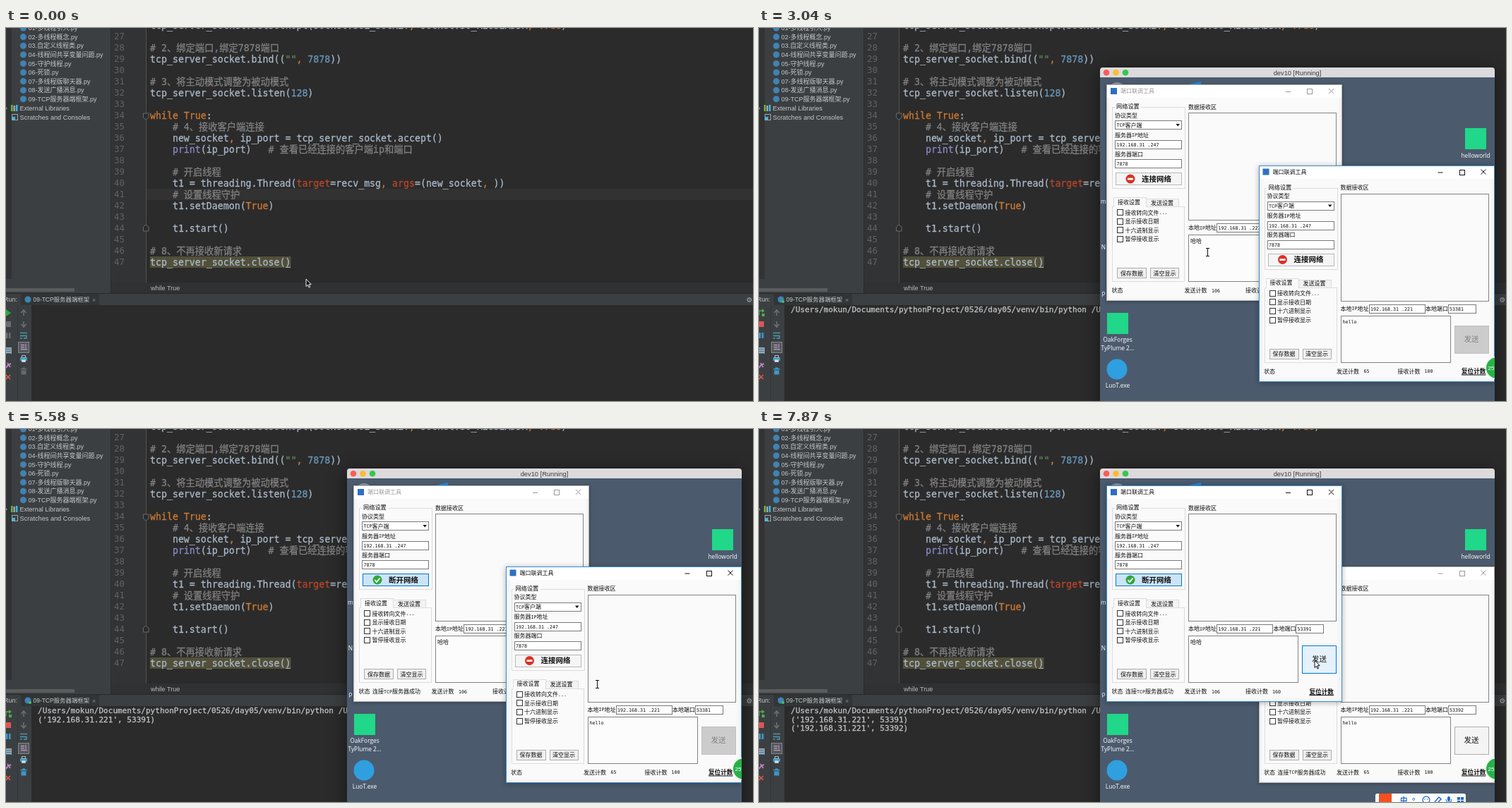
An HTML page with a canvas for the animation above (8 s loop, 1058x529 px).

```html
<!DOCTYPE html>
<html lang="zh">
<head>
<meta charset="utf-8">
<style>
html, body { margin: 0; width: 100%; height: 100%; overflow: hidden; background: #2b2b2b; }
canvas { display: block; }
</style>
</head>
<body>
<canvas id="stage" width="1058" height="529"></canvas>
<script>
const g = document.getElementById('stage').getContext('2d');
const CJK = '"Noto Sans CJK SC","Noto Sans CJK"';
const MONO = `"DejaVu Sans Mono",${CJK},monospace`;
const SANS = `"Liberation Sans",${CJK},sans-serif`;
const UI = `"Open Sans",${CJK},sans-serif`;

// y is the visual middle of the line; returns the x after the text
function text(s, x, y, size, color, family = SANS, weight = '', align = 'left') {
  g.font = `${weight} ${size}px ${family}`;
  g.fillStyle = color;
  g.textAlign = align;
  g.fillText(s, x, y + size * 0.36);
  return x + g.measureText(s).width;
}
// Monospaced text with slightly thickened strokes
function code(s, x, y, size, color) {
  const end = text(s, x, y, size, color, MONO);
  g.strokeStyle = color;
  g.lineWidth = 0.3;
  g.strokeText(s, x, y + size * 0.36);
  return end;
}
// Half-width Latin, full-width Chinese
function label(s, x, y, color = '#111', size = 8, weight = '') {
  for (const c of s) {
    const latin = c < '\x7f';
    text(c, x, y, latin ? size * 0.83 : size, color, MONO, weight);
    x += latin ? size / 2 : size;
  }
}
function fill(color, x, y, w, h) { g.fillStyle = color; g.fillRect(x, y, w, h); }
// Snaps to whole stage pixels
function box(x, y, w, h, back, edge) {
  const { e, f } = g.getTransform();
  x = Math.round(x + e) - e;
  y = Math.round(y + f) - f;
  if (back) fill(back, x, y, w, h);
  g.strokeStyle = edge;
  g.lineWidth = 1;
  g.strokeRect(x + 0.5, y + 0.5, w - 1, h - 1);
}
function dot(color, x, y, r) {
  g.fillStyle = color;
  g.beginPath();
  g.arc(x, y, r, 0, 7);
  g.fill();
}
function trace(pts) {
  g.beginPath();
  for (let i = 0; i < pts.length; i += 2) g.lineTo(pts[i], pts[i + 1]);
}
function line(color, width, ...pts) {
  trace(pts);
  g.strokeStyle = color;
  g.lineWidth = width;
  g.stroke();
}
function poly(color, ...pts) { trace(pts); g.fillStyle = color; g.fill(); }
function round(color, x, y, w, h, r) {
  g.fillStyle = color;
  g.beginPath();
  g.roundRect(x, y, w, h, r);
  g.fill();
}
function shadow(color, blur, dy = 0) {
  g.shadowColor = color;
  g.shadowBlur = blur;
  g.shadowOffsetY = dy;
}

const INK = { d: '#a9b7c6', k: '#cc7832', c: '#808080', b: '#8888c6', a: '#b8462a', n: '#6897bb', s: '#6a8759' };
// Pieces split by "|"; the first letter of each picks its colour
const CODE = {
  26: 'dtcp_server_socket.setsockopt(socket.SOL_SOCKET|k, |dsocket.SO_REUSEADDR|k, True|d)',
  28: 'c# 2、绑定端口,绑定7878端口',
  29: 'dtcp_server_socket.bind((|s""|k, |n7878|d))',
  31: 'c# 3、将主动模式调整为被动模式',
  32: 'dtcp_server_socket.listen(|n128|d)',
  34: 'kwhile True|d:',
  35: 'c    # 4、接收客户端连接',
  36: 'd    new_socket|k, |dip_port = tcp_server_socket.accept()',
  37: 'b    print|d(ip_port)   |c# 查看已经连接的客户端ip和端口',
  39: 'c    # 开启线程',
  40: 'd    t1 = threading.Thread(|atarget|d=recv_msg|k, |aargs|d=(new_socket|k, |d))',
  41: 'c    # 设置线程守护',
  42: 'd    t1.setDaemon(|kTrue|d)',
  44: 'd    t1.start()',
  46: 'c# 8、不再接收新请求',
  47: 'dtcp_server_socket.close()'
};
const FILES = ['01-多线程引入', '02-多线程概念', '03.自定义线程类', '04-线程间共享变量问题', '05-守护线程',
  '06-死锁', '07-多线程版聊天器', '08-发送广播消息', '09-TCP服务器端框架'];
const HOME = '/Users/mokun/Documents/pythonProject/0526/day05/';

function drawEditor(focused) {
  fill('#2b2b2b', 0, 0, 1058, 529);
  fill('#313335', 149, 0, 49, 362);
  if (focused) fill('#323232', 199, 228, 859, 16);
  fill('#55554a', 198, 0, 1, 362);
  fill('#52503a', 204, 324, 199.5, 16);
  for (let n = 26; n < 48; n++) {
    const y = 28 + 16 * (n - 28);
    text(n, 168, y, 12.4, '#606366', MONO, '', 'right');
    let x = 204;
    for (const part of (CODE[n] || 'd').split('|')) x = code(part.slice(1), x, y, 13.25, INK[part[0]]);
  }
  line('#a9b7c6', 1, 396, 339.5, 403, 339.5);
  for (const [y, d] of [[125, 1], [284, -1]]) {
    poly('#2b2b2b', 194, y - 4 * d, 202, y - 4 * d, 202, y + 2 * d, 198, y + 5 * d, 194, y + 2 * d);
    line('#686a6c', 1, 194.5, y - 4 * d, 202, y - 4 * d, 202, y + 2 * d, 198, y + 5 * d, 194.5, y + 2 * d, 194.5, y - 4 * d);
  }
  fill('#2f3133', 149, 361, 909, 16);
  text('while True', 205, 369, 9, '#bbb');
}

function drawTree() {
  fill('#3c3f41', 0, 0, 149, 377);
  fill('#313335', 0, 0, 8, 356);
  fill('#2b2b2b', 148, 0, 1, 377);
  FILES.forEach((name, i) => {
    dot('#3f83b5', 24.5, 12.6 * i, 4.5);
    text(name + '.py', 31.5, 12.6 * i, 9, '#c5c7c9');
  });
  ['#62b543', '#9aa7b0', '#40b6e0'].forEach((c, i) => fill(c, 7 + i * 3.5, 109 + i % 2, 2.5, 9 - i % 2));
  box(8, 122, 9, 9, '', '#9aa7b0');
  fill('#40b6e0', 9, 126, 4, 4);
  poly('#888', 0, 112, 2, 114, 0, 116);
  text('External Libraries', 19.5, 113.5, 9.05, '#c5c7c9');
  text('Scratches and Consoles', 19.5, 126.3, 9.2, '#c5c7c9');
  fill('#595b5d', 0, 369, 97, 5);
}

function drawRun(t) {
  const on = t >= 830;
  fill('#282828', 0, 376, 1058, 1);
  fill('#3c3f41', 0, 377, 1058, 16);
  fill('#323537', 21, 377, 111, 16);
  text('Run:', -3, 385, 9, '#c5c7c9');
  dot('#3f83b5', 31, 385, 4.5);
  if (on) dot('#4fc04f', 34, 388, 2);
  text('09-TCP服务器端框架', 38.5, 385, 8.45, '#c5c7c9');
  text('×', 122, 385.5, 9, '#85888a');
  text('⚙', 1048.5, 385, 10, '#afb1b3', '"DejaVu Sans",sans-serif');
  fill('#3c3f41', 0, 393, 36, 136);
  fill('#323537', 16, 393, 1, 136);
  // left tool column
  if (on) {
    line('#4fa853', 1.5, 0, 407, 0, 401, 5, 401);
    poly('#4fa853', 4, 398, 8, 401, 4, 404);
    fill('#4fa853', 4, 405, 4, 4);
  } else poly('#21b03c', 0, 399, 7, 404, 0, 409);
  fill(on ? '#e05555' : '#6a6c6e', 0, 416, 7, 8);
  for (const x of [0, 4]) fill(on ? '#3e98d0' : '#6a6c6e', x, 432, 2.5, 8);
  fill('#9aa7b0', 0, 453, 8, 9);
  for (let y = 455; y < 462; y += 3) fill('#3e78a0', 0, y, 7, 1);
  line('#b77fc0', 2, 0, 482, 3, 478, 7, 476);
  line('#b77fc0', 2, 2, 475, 6, 481);
  line('#d9584a', 1.6, 0, 492, 6, 498);
  line('#d9584a', 1.6, 0, 498, 6, 492);
  // right tool column
  for (const [y, d] of [[404, -1], [420, 1]]) {
    line('#6f7173', 1.5, 25, y - 4 * d, 25, y + 4 * d);
    line('#6f7173', 1.5, 21.5, y, 25, y + 4 * d, 28.5, y);
  }
  line('#4a9bb5', 1.3, 20, 432.5, 30, 432.5);
  line('#4a9bb5', 1.3, 20, 436.5, 29, 436.5, 29, 440, 25, 440);
  line('#4a9bb5', 1.3, 20, 440, 23, 440);
  box(17, 445, 16, 16, '#55595c', '#84878a');
  for (const y of [449, 452, 455]) fill('#b8a0c4', 21, y, y < 455 ? 5 : 9, 1.3);
  line('#b77fc0', 1.4, 28, 448, 28, 454);
  fill('#3e98c8', 20, 467, 10, 5);
  box(22, 464, 6, 4, '', '#a8c0cc');
  box(22, 470, 6, 4, '#ddd', '#a8c0cc');
  const bin = on ? '#3e98c8' : '#66686a';
  fill(bin, 20.5, 483, 9, 1.5);
  fill(bin, 23, 481.5, 4, 1.5);
  fill(bin, 21.5, 485.5, 7, 6);
  // console
  const out = (s, y) => code(s, 45, y, 11.06, '#c0c2c4');
  if (on) out(`${HOME}venv/bin/python ${HOME}09-TCP服务器端框架.py`, 399);
  if (t >= 4660) out("('192.168.31.221', 53391)", 411.7);
  if (t >= 6130) out("('192.168.31.221', 53392)", 424.4);
  if (t >= 1320 && t < 2240) {
    round('#c6c6c6', -4, 427, 79, 17, 3);
    text('GlassCrateVM', 7, 435.5, 9.1, '#222');
  }
}

function drawTool(w) {
  const black = '#111', grey = '#828282', blue = '#0078d7';
  const frame = w.front ? '#3a8fd0' : '#b4b4b4';
  g.save();
  g.translate(w.x, w.y);
  shadow('rgba(0,0,0,.25)', w.front ? 7 : 4, 1);
  box(0, 0, 334, 307, '#fafafa', frame);
  shadow('transparent', 0);
  box(0, 0, 334, 19, '#fff', '#fff');
  box(0, 0, 334, 307, '', frame);
  const ink = w.front ? black : '#999';
  fill('#2f6fc0', 6, 5, 9, 9);
  label('端口联调工具', 20, 9.5, ink);
  line(ink, 1, 254, 10.5, 261, 10.5);
  box(284, 6, 8, 8, '', ink);
  line(ink, 1, 315, 6, 322, 13);
  line(ink, 1, 315, 13, 322, 6);

  // connection settings
  box(8, 32, 104, 116, '', '#dcdcdc');
  fill('#fafafa', 12, 27, 37, 9);
  label('网络设置', 14, 31.5, black, 8.2);
  const field = (s, x, y, width) => {
    box(x, y, width, 13, '#fff', '#7a7a7a');
    label(s, x + 2.5, y + 6.7);
  };
  label('协议类型', 12, 44);
  field('TCP客户端', 12, 51, 95);
  poly(black, 98.5, 56, 104, 56, 101.2, 59.5);
  label('服务器IP地址', 12, 72);
  field('192.168.31 .247', 12, 79, 95);
  label('服务器端口', 12, 99);
  field('7878', 12, 106, 95);
  box(13, 125, 94, 18, w.on ? '#cce4f7' : w.hover ? '#e1effa' : '#f5f5f5', w.on || w.hover ? blue : '#b8b8b8');
  dot(w.on ? '#2fa83a' : '#dc3023', 34, 134, 6.5);
  if (w.on) line('#fff', 1.8, 30.5, 134, 33, 137, 37.5, 131.5);
  else fill('#fff', 30, 132.7, 8, 2.8);
  label(w.on ? '断开网络' : '连接网络', 50, 134, black, 10.5, 'bold');

  // tabs
  box(8, 173, 103, 107, '', '#dcdcdc');
  box(56, 162, 47, 12, '#f3f3f3', '#dcdcdc');
  box(10, 160, 47, 14, '#fafafa', '#dcdcdc');
  fill('#fafafa', 11, 172, 45, 3);
  label('接收设置', 16, 167);
  label('发送设置', 63, 168);
  ['接收转向文件...', '显示接收日期', '十六进制显示', '暂停接收显示'].forEach((s, i) => {
    const y = 181.7 + 12.6 * i;
    box(15, y - 4.5, 9, 9, '#fff', '#333');
    label(s, 26.5, y);
  });
  box(15, 260, 42, 15, '#f0f0f0', '#adadad');
  label('保存数据', 20, 267.8);
  box(62, 260, 41, 15, '#f0f0f0', '#adadad');
  label('清空显示', 66.5, 267.8);

  // data areas
  label('数据接收区', 116, 32);
  box(116, 40, 210, 153, '#fafafa', grey);
  label('本地IP地址', 116, 203.5);
  field('192.168.31 .221', 156, 197, 80);
  label('本地端口', 236.5, 203.5);
  field(w.port, 268, 197, 40);
  box(116, 213, 156, 67, '#fcfcfc', grey);
  label(w.msg, 119, 222);
  const send = w.sendHover ? ['#e5f1fb', blue] : !w.on ? ['#cccccc', '#bfbfbf'] : [w.front ? '#e1e1e1' : '#f4f4f4', '#adadad'];
  box(277, 227, 49, 40, ...send);
  label('发送', 291, 246.5, w.on ? black : grey, 10.5);

  // status bar
  label('状态', 7.5, 292.5);
  if (w.on) label('连接TCP服务器成功', 27, 292.5);
  label('发送计数', 110.5, 292.5);
  label(w.sent, 149, 292.5);
  label('接收计数', 197, 292.5);
  label(w.got, 235, 292.5);
  label('复位计数', 287.5, 292.5, black, 8.6, 'bold');
  fill(black, 287.5, 297, 34.5, 1);
  g.restore();
}

function drawMachine(t, frontA) {
  shadow('rgba(0,0,0,.5)', 24, 4);
  round('#dcdadc', 483, 56, 559, 500, [4, 4, 0, 0]);
  shadow('transparent', 0);
  ['#fc5b57', '#fdbc2e', '#34c84a'].forEach((c, i) => dot(c, 492 + 13.5 * i, 63.3, 4.3));
  text('dev10 [Running]', 762.5, 63.5, 9.3, '#3c3c3c', SANS, '', 'center');
  g.save();
  g.beginPath();
  g.rect(483, 70, 559, 459);
  g.clip();
  fill('#4b5b6d', 483, 70, 559, 459);
  dot('#8b949c', 507, 90, 13);
  poly('#1e88e5', 608, 80, 626, 76, 626, 80);
  const name = (s, x, y) => text(s, x, y, 8.4, '#fff', UI, '', 'center');
  [['m', 246], ['N', 311], ['P', 378]].forEach(([s, y]) => name(s, 488, y));
  fill('#21d789', 1000, 142, 30, 30);
  name('helloworld', 1015, 181);
  fill('#21d789', 493, 404, 30, 30);
  name('OakForges', 508, 442);
  name('TyPlume 2...', 508, 453.5);
  dot('#2f9fe0', 507, 484, 14.5);
  name('LuoT.exe', 508, 507);

  const a = { x: 492, y: 80, front: frontA, on: t >= 4510, hover: t >= 4210, sendHover: t >= 7700,
    port: t >= 4510 ? '53391' : '53380', msg: '哈哈', sent: '106', got: '160' };
  const b = { x: 707.5, y: 194.5, front: !frontA, on: t >= 5980, hover: t >= 5830,
    port: t >= 5980 ? '53392' : '53381', msg: 'hello', sent: '65', got: '100' };
  (frontA ? [b, a] : [a, b]).forEach(drawTool);

  dot('#e8f5ea', 1045, 482, 16.5);
  dot('#27b148', 1045, 482, 15);
  text('25', 1032.5, 482, 8, '#fff');
  if (t >= 7250) drawInputBar();
  g.restore();
}

function drawInputBar() {
  const blue = '#2468c8';
  round('#fdfdfd', 873, 517, 128, 20, 3);
  fill('#f4511e', 878, 517, 18, 12);
  text('中', 908, 526, 10.5, blue, SANS, 'bold');
  text('°,', 925, 527, 11, blue, SANS, 'bold');
  dot(blue, 945, 526, 5.5);
  dot('#fdfdfd', 945, 526, 4.3);
  for (const x of [943, 947]) dot(blue, x, 525, 0.8);
  line(blue, 1.5, 957, 529, 963, 522, 966, 525, 961, 530);
  round(blue, 975, 521, 4, 7, 2);
  line(blue, 1, 973, 525, 974, 529, 980, 529, 981, 525);
  for (const x of [989, 994]) for (const y of [522, 527]) fill(blue, x, y, 4, 4);
}

const PATH = [[0, 425, 356], [85, 425, 356], [700, 3, 401], [1000, 3, 401], [1160, -20, 420], [1909, -20, 420],
  [1910, 322, 431], [2850, 635, 318], [3000, 635, 318], [4000, 554, 219], [4200, 555, 216], [4660, 555, 216],
  [5100, 898, 345], [5250, 898, 352], [5540, 839, 363], [5850, 770, 329], [6150, 770, 329], [6480, 690, 345],
  [6750, 674, 331], [7150, 674, 331], [7820, 787, 328], [8000, 787, 328]];

// The pointer is only sampled every 152.5 ms
function pointerAt(t) {
  const q = Math.max(0, 85 + 152.5 * Math.floor((t - 85) / 152.5));
  const i = PATH.findIndex(p => p[0] > q);
  const [t0, x0, y0] = PATH[i - 1], [t1, x1, y1] = PATH[i];
  const u = (q - t0) / (t1 - t0), e = u * u * (3 - 2 * u);
  return [x0 + (x1 - x0) * e, y0 + (y1 - y0) * e];
}
const within = (x, y, l, top, w, h) => x > l && x < l + w && y > top && y < top + h;
const overText = (x, y, l, top) => within(x, y, l + 116, top + 40, 210, 153) || within(x, y, l + 116, top + 213, 156, 67);

function drawPointer(t, frontA) {
  const [x, y] = pointerAt(t);
  const inA = within(x, y, 492, 80, 334, 307), inB = within(x, y, 708, 195, 334, 307);
  const beam = t >= 1940 && (inA && (frontA || !inB) ? overText(x, y, 492, 80) : inB && overText(x, y, 708, 195));
  g.save();
  g.translate(Math.round(x), Math.round(y));
  if (beam) {
    line('#111', 1, 0.5, -5, 0.5, 5);
    for (const d of [-5.5, 5.5]) line('#111', 1, -2, d, 3, d);
  } else {
    const shape = [0, 0, 0, 10.5, 2.4, 8.3, 4, 12, 5.6, 11.3, 4, 7.7, 7.2, 7.6, 0, 0];
    const guest = t >= 1940 && x > 483;
    poly(guest ? '#fff' : '#111', ...shape);
    line(guest ? '#111' : '#eee', 1, ...shape);
  }
  g.restore();
}

function frame(now) {
  const t = now % 8000;
  const frontA = t >= 7100 || (t >= 4510 && t < 5130);
  const open = t >= 1940;
  drawEditor(!open);
  drawTree();
  drawRun(t);
  if (open) drawMachine(t, frontA);
  drawPointer(t, frontA);
  requestAnimationFrame(frame);
}
requestAnimationFrame(frame);
</script>
</body>
</html>
```
